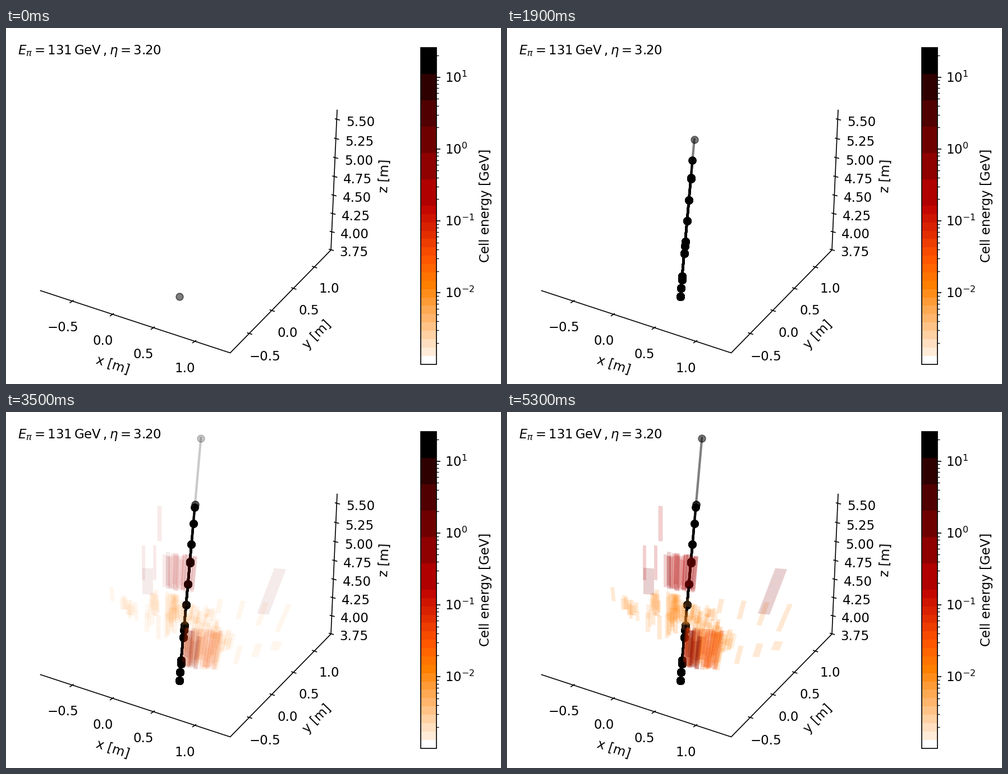
These frames come from a looping animation (882x635 px, 6300 ms). A matplotlib script:

```python
import numpy as np
import matplotlib.pyplot as plt
from matplotlib.animation import FuncAnimation
from matplotlib.collections import PolyCollection

W, H, DPI = 882, 635, 150
FRAMES, STEP_MS = 63, 100
TRACK_END, SHOWER_START, SHOWER_END = 22, 26, 53

plt.rcParams.update({"font.family": "DejaVu Sans", "font.size": 11})
fig = plt.figure(figsize=(W / DPI, H / DPI), dpi=DPI, facecolor="white")
ax = fig.add_axes([0, 0, 1, 1])
ax.axis("off")
heat = plt.get_cmap("gist_heat_r")
rng = np.random.default_rng(7)


def line(x0, y0, x1, y1, lw=0.8):
    ax.plot([x0, x1], [y0, y1], color="black", lw=lw, solid_capstyle="butt")


def label(x, y, s, ha="center"):
    """Text whose digits are centred vertically on y."""
    ax.text(x, y + 7.9, s, ha=ha, va="baseline")


def tilted(x, y, s, angle):
    ax.text(x, y, s, rotation=angle, ha="center", va="center")


def draw_ticks(names, start, step, bend, half, offset, drift):
    """Ticks along an axis seen in perspective (spacing changes by bend)."""
    vectors = map(np.array, (start, step, bend, half, offset, drift))
    start, step, bend, half, offset, drift = vectors
    for k, name in enumerate(names):
        p = start + step * k + bend * k ** 2
        line(*(p - half), *(p + half))
        label(*(p + offset + drift * k), name)


def draw_frame():
    ax.plot([61.5, 399.5, 579, 590], [468.5, 579.5, 396, 146.5],
            color="black", lw=0.8)
    names = [f"{v:.1f}".replace("-", "\u2212") for v in (-0.5, 0, 0.5, 1)]
    draw_ticks(names, (117, 488), (71, 23.35), (0.62, 0.16),
               (3.6, -2.4), (-16, 45), (-0.17, 0.5))
    draw_ticks(names, (434, 545), (41.05, -41.6), (-0.83, 0.7),
               (4.6, 1.5), (27.5, 40), (-0.4, -0.67))
    draw_ticks([f"{3.75 + 0.25 * k:.2f}" for k in range(8)],
               (579.6, 395.8), (1.56, -31.9), (0, -0.192),
               (4.5, 1.2), (40, 3.7), (0.21, 0.11))
    tilted(190, 602, "x [m]", -18.2)
    tilted(554, 547, "y [m]", 45.6)
    tilted(675, 264, "z [m]", 87.5)
    ax.text(21.3, 47, r"$E_\pi = 131\,\mathrm{GeV}\,, \eta = 3.20$")


def draw_colorbar():
    x0, x1, top, mid, bottom = 738.5, 767, 34.5, 317, 599.5
    # wide bands for the dark half, narrow ones for the light half
    edges = np.r_[np.linspace(top, mid, 7), np.linspace(mid, bottom, 20)[1:]]
    centres = (edges[:-1] + edges[1:]) / 2
    colors = [heat((bottom - c) / (bottom - top)) for c in centres]
    colors[0], colors[-1] = "black", "white"
    ax.bar(x0, np.diff(edges), x1 - x0, edges[:-1], align="edge",
           color=colors, antialiased=False)
    ax.add_patch(plt.Rectangle((x0, top), x1 - x0, bottom - top,
                               fc="none", ec="black", lw=0.8))
    for exp in range(-3, 2):
        y = 215.8 - 128.2 * exp
        if exp > -3:
            line(x1, y, x1 + 7.3, y)
            label(782.5, y + 1, rf"$\mathdefault{{10^{{{exp}}}}}$", "left")
        for m in range(2, 10):
            ym = y - 128.2 * np.log10(m)
            if ym > top:
                line(x1, ym, x1 + 4.2, ym, 0.6)
    tilted(854.7, 316.5, "Cell energy [GeV]", 90)


# Particle track: straight line, with a marker at every interaction point
py = np.array([478.5, 463.5, 448.5, 442.5, 402, 388.5, 380.5, 343.5,
               307, 269, 267.3, 236, 198.5, 170.3, 165.3, 46.5])
px = 308.9 + 38.4 * (py[0] - py) / (py[0] - py[-1])


def track(first, last, alpha):
    return ax.plot(px[first:last + 1], py[first:last + 1], "o-",
                   color="black", lw=2, alpha=alpha, zorder=3)[0]


def build_track():
    """Translucent strokes pile up: each step redraws all partial paths."""
    strokes = []
    for f in range(TRACK_END + 1):
        newest = f * 15 // 23
        strokes += [(f, track(0, j, 0.5)) for j in range(newest + 1)]
    return strokes


# Calorimeter cells: bars that lean away from the beam
def bar(x, y, w, h):
    slope = -0.0021 * max(x - 290, 0) - 0.0018 * min(x - 240, 0)
    lean, tilt = slope * h / 2, 0.045 * w
    return [(x - w / 2 - lean, y - h / 2 - tilt),
            (x + w / 2 - lean, y - h / 2 + tilt),
            (x + w / 2 + lean, y + h / 2 + tilt),
            (x - w / 2 + lean, y + h / 2 - tilt)]


def build_cells():
    polys, levels = [], []

    def add(x, y, w, h, level):
        polys.append(bar(x, y, w, h))
        levels.append(level)

    def cluster(n, xs, ys, heights, level, slope=0.0):
        """Random bars between two edges that fall to the right by slope."""
        for x in np.linspace(*xs, n) + rng.uniform(-2, 2, n):
            h = rng.uniform(*heights)
            y = rng.uniform(ys[0] + h / 2, ys[1] - h / 2)
            add(x, y + slope * (x - xs[0]), rng.uniform(6, 9), h,
                rng.uniform(*level))

    pale, orange = (0.14, 0.28), (0.24, 0.42)
    cluster(18, (284, 304), (318, 404), (25, 55), pale)
    cluster(64, (296, 376), (322, 384), (12, 30), pale, 0.35)
    cluster(14, (370, 402), (376, 436), (14, 32), pale)
    cluster(10, (208, 231), (325, 374), (14, 30), pale)
    cluster(12, (252, 271), (314, 406), (18, 45), pale)
    cluster(56, (318, 379), (382, 456), (35, 70), orange, 0.12)
    cluster(13, (319, 342), (382, 456), (45, 70), (0.6, 0.8), 0.2)
    cluster(25, (284, 336), (248, 316), (52, 67), (0.46, 0.64), 0.15)

    # isolated hits
    for i in range(4):
        add(380 + 38 * i, 346 + 7 * i, 9, 25 + 8 * i, 0.22)
        add(379 + 34 * i, 441 - 8 * i, 6 + 3 * i, 40 - 8 * i, 0.22)
    for x in (245, 265):
        add(x, 269, 6, 62, 0.5)
    add(273.5, 199, 8, 63, 0.5)
    add(189, 325, 7, 25, 0.22)
    add(252.5, 302, 19, 47, 0.65)
    add(473, 320, 21, 81, 0.65)
    coll = PolyCollection(polys, facecolors=heat(levels),
                          edgecolors="none", zorder=4)
    return ax.add_collection(coll, autolim=False)


draw_frame()
draw_colorbar()
strokes = build_track()
exit_line = track(14, 15, 0)
cells = build_cells()
ax.set_xlim(0, W)
ax.set_ylim(H, 0)


def fade(f):
    """Linear fade of the shower with a soft onset."""
    if f < SHOWER_START:
        return 0.0
    f = min(f, SHOWER_END)
    return (f - TRACK_END) / (SHOWER_END - TRACK_END) * min(1, (f - 24) / 5)


def update(f):
    for born, stroke in strokes:
        stroke.set_visible(born <= f)
    s = fade(f)
    exit_line.set_visible(s > 0)
    exit_line.set_alpha(0.5 * s)
    cells.set_visible(s > 0)
    cells.set_alpha(0.19 * s)
    return []


anim = FuncAnimation(fig, update, frames=FRAMES, interval=STEP_MS,
                     init_func=lambda: update(0), repeat=True,
                     cache_frame_data=False)
plt.show()
```
